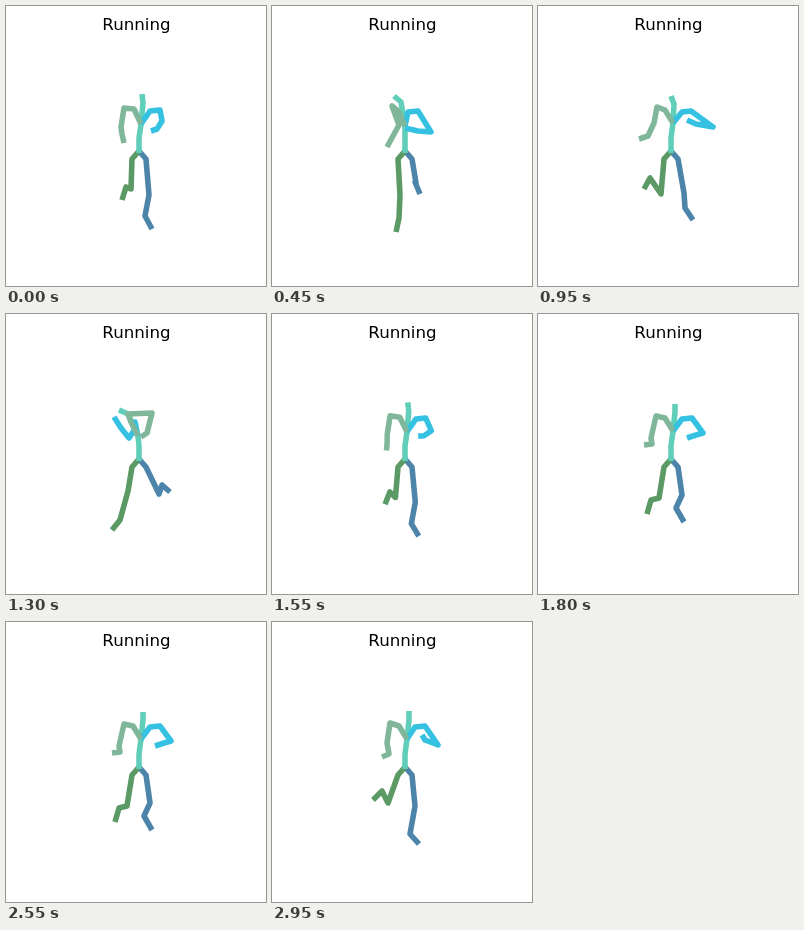
Recreate the animation shown at these times as an HTML page. Size 260 px wide and 280 px high, loop 3000 ms.

```html
<!DOCTYPE html>
<html lang="en">
<head>
<meta charset="utf-8">
<title>Running</title>
<style>
  html, body { margin: 0; width: 100%; height: 100%; overflow: hidden; background: #fff; }
  svg { display: block; width: 260px; height: 280px; }
  text { font: 16.67px "DejaVu Sans", sans-serif; text-anchor: middle; }
  polyline { fill: none; stroke-width: 5.56; stroke-linejoin: round; }
</style>
</head>
<body>
<svg viewBox="0 0 260 280">
  <text x="130.5" y="24">Running</text>
  <polyline id="legR" stroke="#4D84AA"/>
  <polyline id="legL" stroke="#5B9965"/>
  <polyline id="spine" stroke="#61CEB9"/>
  <polyline id="armR" stroke="#34C1E2"/>
  <polyline id="armL" stroke="#80B79A"/>
</svg>
<script>
const LOOP = 3000, STEP = 50;

// Each limb lists x,y pairs outward from its fixed root.
const plant = {
  legR: [143,189, 139,210, 146,223],
  legL: [125,183, 120,181, 116,194],
  spine: [135,118, 137,97, 136,88],
  armR: [144,105, 154,104, 156,115, 151,123, 145,125],
  armL: [128,103, 118,102, 115,121, 116,128, 118,137]
};
const turn = {
  legR: [144,177, 143,176, 148,188],
  legL: [128,189, 127,212, 124,226],
  spine: [133,120, 129,96, 122,90],
  armR: [136,106, 146,105, 159,126, 146,125, 133,122],
  armL: [126,105, 120,100, 127,119, 121,130, 115,141]
};
const reach = {
  legR: [146,187, 147,202, 155,214],
  legL: [123,188, 112,172, 106,183],
  spine: [135,117, 136,98, 133,90],
  armR: [144,106, 153,105, 175,121, 158,118, 149,114],
  armL: [127,104, 119,101, 116,117, 110,130, 101,133]
};
const push = {
  legR: [153,180, 156,171, 164,178],
  legL: [122,177, 114,206, 106,216],
  spine: [132,122, 122,100, 113,96],
  armR: [129,108, 129,115, 123,124, 115,114, 108,103],
  armL: [125,108, 122,100, 146,99, 141,119, 135,123]
};
const float = {
  legR: [144,181, 138,194, 146,208],
  legL: [121,184, 113,186, 109,200],
  spine: [135,117, 137,98, 137,90],
  armR: [144,105, 154,104, 165,119, 158,121, 149,124],
  armL: [127,104, 118,102, 113,124, 114,130, 106,131]
};
const land = {
  legR: [143,185, 136,213, 145,223],
  legL: [116,183, 111,167, 103,176],
  spine: [135,117, 136,98, 136,89],
  armR: [143,105, 153,104, 166,123, 153,118, 150,113],
  armL: [127,104, 118,101, 116,120, 114,133, 106,136]
};
const landWide = {
  ...land,
  legR: [143,184, 138,212, 147,222],
  legL: [116,181, 110,169, 101,178],
  spine: [135,117, 137,98, 137,89],
  armL: [127,104, 118,101, 115,121, 117,132, 110,135]
};

const roots = {
  legR: () => [133,145, 140,153],
  legL: () => [133,145, 126,153],
  spine: () => [133,147, 133,132],
  armR: pose => pose.spine.slice(0, 2),
  armL: pose => pose.spine.slice(0, 2)
};

function mix(a, b, k) {
  const pose = {};
  for (const limb in a) pose[limb] = a[limb].map((v, i) => v + (b[limb][i] - v) * k);
  return pose;
}

const easyReach = mix(land, reach, 0.4);
const stride = (t, swing, end) => [
  [t, plant], [t + 200, swing], [t + 300, float],
  [t + 450, turn], [t + 550, push], [t + 700, end]
];
const keys = [
  // The opening stride is smaller and slower.
  [0, plant], [220, mix(plant, float, 0.5)], [450, turn], [600, push], [730, land], [790, plant],
  ...stride(750, reach, landWide).slice(1),
  ...stride(1500, easyReach, land),
  ...stride(2250, easyReach, landWide),
  [LOOP, plant]
];

function poseAt(t) {
  const i = keys.findIndex(key => key[0] > t);
  const [t0, a] = keys[i - 1], [t1, b] = keys[i];
  return mix(a, b, (t - t0) / (t1 - t0));
}

function draw(now) {
  const pose = poseAt(Math.floor(now % LOOP / STEP) * STEP);
  for (const limb in roots) {
    const points = [...roots[limb](pose), ...pose[limb]];
    document.getElementById(limb).setAttribute("points", points.join(" "));
  }
}

const start = performance.now();
function tick() {
  draw(performance.now() - start);
  requestAnimationFrame(tick);
}
tick();
</script>
</body>
</html>
```
